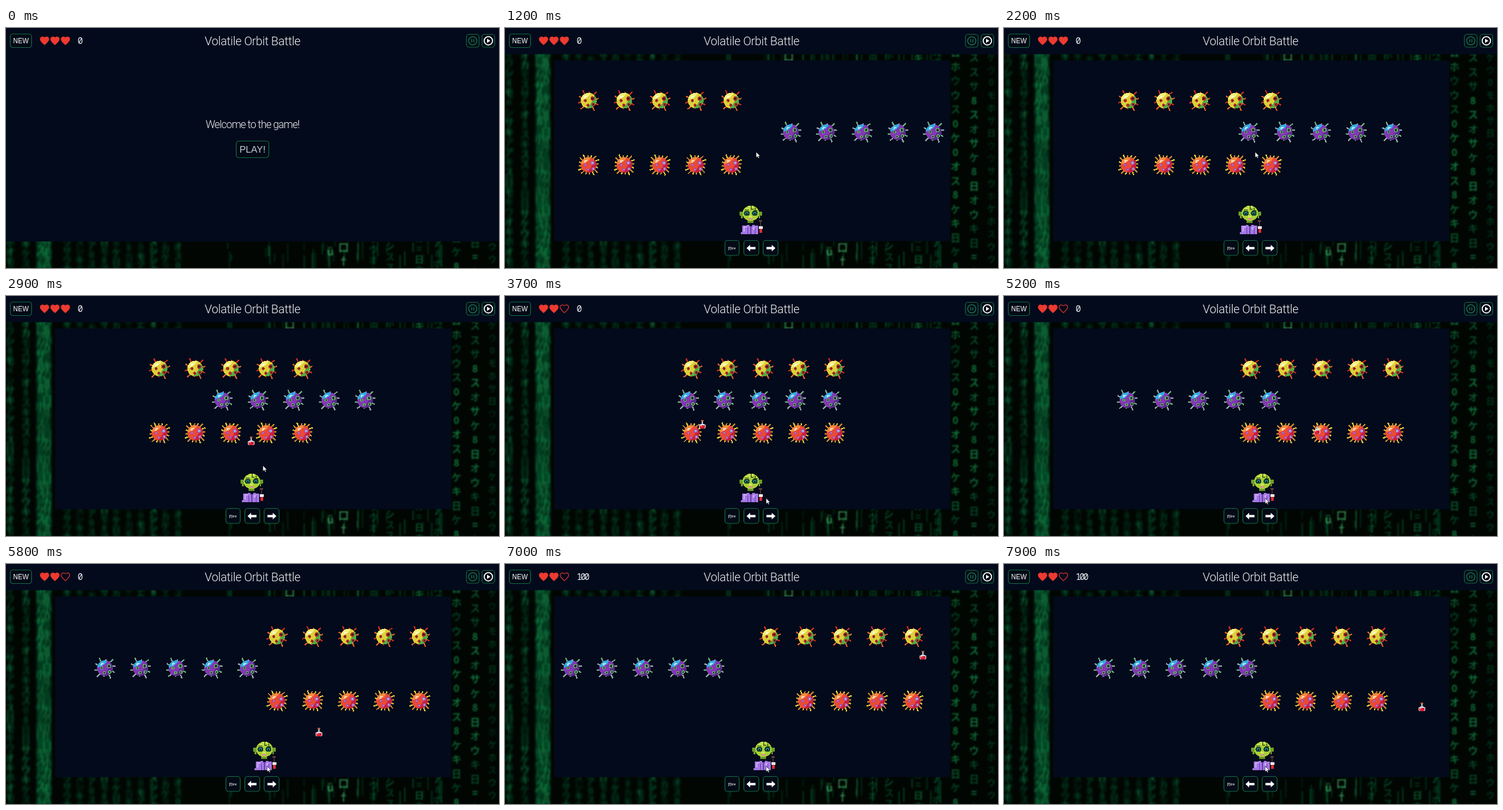
An HTML page that plays this animation: 742 by 362 pixels, repeating every 8 s.

```html
<!DOCTYPE html>
<html lang="en">
<head>
<meta charset="utf-8">
<title>Volatile Orbit Battle</title>
<style>
html, body { margin: 0; width: 100%; height: 100%; overflow: hidden; background: #030a1b; }
svg { display: block; width: 742px; height: 362px; }
.px { shape-rendering: crispEdges; }
.ui { font-family: "Liberation Sans", Arial, sans-serif; fill: #fff; }
.thin { font-family: Roboto, "Open Sans", sans-serif; font-weight: 300; fill: #eef2f6; }
.mono { font-family: "Noto Sans Mono", "DejaVu Sans Mono", monospace; fill: #eef2f6; }
.rain { font-family: "Noto Sans CJK JP", "Noto Sans CJK", "Noto Sans", sans-serif; font-weight: 700; text-anchor: middle; }
.box { fill: #030a16; stroke: #12633f; stroke-width: 1.2; }
</style>
</head>
<body>
<svg id="stage" viewBox="0 0 742 362" xmlns="http://www.w3.org/2000/svg">
  <defs>
    <filter id="soft" x="-5%" y="-5%" width="110%" height="110%"><feGaussianBlur stdDeviation="1.7 2.2"/></filter>
    <filter id="fine" x="-5%" y="-5%" width="110%" height="110%"><feGaussianBlur stdDeviation="0.8"/></filter>
    <path id="heart" transform="scale(.64) translate(-12 -12.2)" d="M12 21.35l-1.45-1.32C5.4 15.36 2 12.28 2 8.5 2 5.42 4.42 3 7.5 3c1.74 0 3.41.81 4.5 2.09C13.09 3.81 14.76 3 16.5 3 19.58 3 22 5.42 22 8.5c0 3.78-3.4 6.86-8.55 11.54z"/>
    <path id="arrow" d="M-7 0L-1.5-5V-1.7H6.5V1.7H-1.5V5Z" fill="#fff"/>
    <g id="flask" class="px">
      <path d="M-2-7h4v2h-4z" fill="#b5573a"/>
      <path d="M-1-5h2v4h-2z" fill="#b9c4cf"/>
      <path d="M-3-1h6v1h2v5h-1v1h-8v-1h-1v-5h2z" fill="#d5dce2"/>
      <path d="M-4 1h8v4h-1v1h-6v-1h-1z" fill="#d51f36"/>
      <path d="M-3 1h2v2h-2z" fill="#ff8a8a"/>
    </g>
    <g id="hero" class="px">
      <path d="M-18-12h5v10h-3v-4h-2zM16-12h-5v10h2v-4h3z" fill="#6f9f2c"/>
      <path d="M-6 0h9v6h-9z" fill="#6a932a"/>
      <ellipse cx="-1" cy="-9.5" rx="12.5" ry="11.5" fill="#a9cf35"/>
      <path d="M-9-17h7v2h-7zM-6-20h10v2h-10zM-4-6h5v3h-5z" fill="#cbe757"/>
      <path d="M-1-21h1v5h3v1h-4zM5-18h1v4h-1zM-10-15h6v1h-6zM3-14h6v1h-6z" fill="#24381b"/>
      <ellipse cx="-7" cy="-9.5" rx="4.5" ry="3.5" fill="#133f3b"/>
      <ellipse cx="5" cy="-9.5" rx="4.5" ry="3.5" fill="#133f3b"/>
      <path d="M-9-11h4v3h-4zM3-11h4v3h-4z" fill="#2a9a90"/>
      <path d="M-8-10h2v2h-2zM4-10h2v2h-2z" fill="#06110f"/>
      <path d="M-4-2h6v2h-6z" fill="#e784a7"/>
      <path d="M-6 5h9v1h-9z" fill="#15200f"/>
      <path d="M-14 9h7v-1h4v2h4v-2h4v1h5v13h-26v-3h2z" fill="#a578e6"/>
      <path d="M-12 10h5v2h-3v6h-2zM2 11h4v4h-4z" fill="#c9a4f6"/>
      <path d="M-6 12h1v10h-1zM5 12h1v10h-1zM-2 10h2v12h-2z" fill="#6a42ab"/>
      <path d="M11 1h5v2h-5zM13 3h1v7h-1z" fill="#71423c"/>
      <path d="M11 10h6v4h-6z" fill="#eff1f2"/><path d="M12 14h4v6h-4z" fill="#e02c34"/>
    </g>
  </defs>
  <rect width="742" height="362" fill="#010603"/>
  <g id="rain" class="rain"></g>
  <g id="intro">
    <rect width="742" height="322" fill="#030a1b"/>
    <text class="thin" x="371" y="151" font-size="16" letter-spacing="-.8" text-anchor="middle">Welcome to the game!</text>
    <rect class="box" x="346.5" y="170.5" width="49" height="25" rx="4"/>
    <text class="ui" x="371" y="188" font-size="14.2" text-anchor="middle" style="fill:#bfc9d6">PLAY!</text>
  </g>
  <g id="game">
    <rect width="742" height="39.5" fill="#030a1b"/>
    <rect x="74" y="49" width="596" height="272.5" fill="#030a1b"/>
    <g id="yellows"></g>
    <g id="reds"></g>
    <use id="shot" href="#flask"/>
    <g id="purples"></g>
    <use id="player" href="#hero"/>
    <rect class="box" x="331" y="320.5" width="21.5" height="22.5" rx="4"/>
    <rect class="box" x="359.5" y="320.5" width="22.5" height="22.5" rx="4"/>
    <rect class="box" x="388.5" y="320.5" width="22.5" height="22.5" rx="4"/>
    <text class="ui" x="341.5" y="334" font-size="6" text-anchor="middle">[f]ire</text>
    <use href="#arrow" x="370.5" y="332"/>
    <use href="#arrow" transform="translate(400 332) scale(-1 1)"/>
  </g>
  <rect class="box" x="6.5" y="9" width="32" height="20.5" rx="4"/>
  <text class="ui" x="22.5" y="23" font-size="10" text-anchor="middle">NEW</text>
  <g fill="#ee3a30" stroke="#ee3a30" stroke-width="1.6">
    <use href="#heart" x="58" y="19.3"/>
    <use href="#heart" x="73.7" y="19.3"/>
    <use id="life" href="#heart" x="89.4" y="19.3"/>
  </g>
  <text id="score" class="mono" x="107.8" y="23.9" font-size="13.5" letter-spacing="-2.4">0</text>
  <text class="thin" x="371" y="26" font-size="18" letter-spacing="-.3" text-anchor="middle">Volatile Orbit Battle</text>
  <rect class="box" x="693" y="9.5" width="19" height="19.5" rx="4"/>
  <rect class="box" x="716.5" y="9.5" width="19" height="19.5" rx="4"/>
  <g fill="none" stroke="#1c7350" stroke-width="1.3">
    <circle cx="702.5" cy="19.3" r="6.2"/><path d="M700.9 16.8v5M704.1 16.8v5"/>
  </g>
  <circle cx="726" cy="19.3" r="6.3" fill="none" stroke="#fff" stroke-width="1.6"/>
  <path d="M724 16.2l5 3.1-5 3.1z" fill="#fff"/>
  <path id="cursor" d="M0 0V8.5L2 6.7 3.4 9.6 4.8 9 3.5 6.2H6Z" fill="#fff" stroke="#000" stroke-width=".5"/>
</svg>
<script>
const $ = id => document.getElementById(id);
const LOOP = 8000, START = 600, GAP = 53.7;

function seeded(s) {
  return () => {
    s = (s * 1664525 + 1013904223) >>> 0;
    return s / 4294967296;
  };
}

// Falling-code backdrop: blurred on the left, streaks mid-way, glyphs on the right
function buildRain() {
  const rnd = seeded(41), glyphs = "アウオカキケサシス日8日0=ホモ";
  const hidden = (x, y) => x > 84 && x < 660 && y > 66 && y < 312;

  const column = (x, size, pitch, alpha) => {
    let out = "";
    for (let y = 40 + rnd() * pitch; y < 376; y += pitch) {
      const a = alpha * (0.45 + 0.55 * rnd());
      const ch = glyphs[Math.floor(rnd() * glyphs.length)];
      if (!hidden(x, y)) out += `<text x="${x}" y="${y.toFixed(1)}" font-size="${size}" fill-opacity="${a.toFixed(2)}">${ch}</text>`;
    }
    return out;
  };
  const streak = (x, y, w, h, a) =>
    `<rect x="${x.toFixed(1)}" y="${y.toFixed(1)}" width="${w}" height="${h.toFixed(1)}" fill-opacity="${a.toFixed(2)}"/>`;

  let soft = streak(46, 36, 22, 330, 0.28), fine = "";
  for (const x of [52, 62]) soft += column(x, 17, 13, 0.9);
  for (const x of [6, 30]) soft += column(x, 15, 15, 0.75);
  for (let x = 92; x < 268; x += 18.5) soft += column(Math.round(x), 14, 14, 0.45 + rnd() * 0.5);
  for (let i = 0; i < 40; i++) {
    const x = 330 + rnd() * 330;
    fine += streak(x, 318 + rnd() * 25, 1.5, 8 + rnd() * 26, 0.2 + rnd() * 0.4);
    fine += streak(x, 39, 1.5, 10, 0.2 + rnd() * 0.4);
  }
  for (const x of [553, 578, 622, 650]) fine += column(x, 14, 16, 0.75);
  for (const x of [678, 706]) fine += column(x, 15, 21.5, 0.95);
  fine += column(732, 13, 19, 0.4);
  fine += [["ü", 488, 343], ["口", 508, 337], ["†", 508, 357], ["口", 427, 49]]
    .map(([ch, x, y]) => `<text x="${x}" y="${y}" font-size="16" font-weight="400" fill="#45b96c">${ch}</text>`).join("");
  $("rain").innerHTML =
    `<g fill="#0f8a48" filter="url(#soft)">${soft}</g><g fill="#0f7d40" filter="url(#fine)">${fine}</g>`;
}

// Viruses: a shaded ball with ringed spots and spikes that are longest on the diagonals
const kinds = {
  yellow: { spikes: ["#c92d20", "#d9622a"], base: "#dccf38", shade: "#4fae45", light: "#f4ee7a", spot: "#b3342c", core: "#4d1420" },
  purple: { spikes: ["#6fae84", "#93a9ad"], base: "#8338b4", shade: "#5d2a8e", light: "#30aede", spot: "#5fae62", core: "#2a2440" },
  red: { spikes: ["#dcc83a", "#c58a30"], base: "#ea4a34", shade: "#c5203a", light: "#f48a3c", spot: "#b8479c", core: "#9cb4e0" }
};

function virus({ spikes, base, shade, light, spot, core }, count) {
  let out = "";
  for (let k = 0; k < count; k++) {
    const a = (k + 0.5) * 2 * Math.PI / count;
    const len = 13 + 5 * Math.abs(Math.sin(2 * a));
    const at = (r, turn) => `${(Math.cos(a + turn) * r).toFixed(1)} ${(Math.sin(a + turn) * r).toFixed(1)}`;
    out += `<path d="M${at(8, 0)}L${at(len, 0.12)}" stroke="${spikes[k % 2]}" stroke-width="2"/>`;
  }
  out += `<circle r="11.8" fill="${base}"/>` +
    `<path d="M8.5-8.2A11.8 11.8 0 0 1-3 11.4Q5 5 8.5-8.2Z" fill="${shade}"/>` +
    `<path d="M-11-4A11.8 11.8 0 0 1 3-11.2Q1-4-11-1Z" fill="${light}"/>` +
    `<path d="M-6-8h4v2h-2v2h-3z" fill="#fff" fill-opacity=".6"/>`;
  for (const [x, y, r] of [[-5, 0, 2.4], [6, -3, 3.2], [-1, 7, 2.4], [7, 6, 2.6]])
    out += `<circle cx="${x}" cy="${y}" r="${r}" fill="${spot}"/><circle cx="${x}" cy="${y}" r="${r - 1.4}" fill="${core}"/>`;
  return out;
}

function buildRow(id, kind, y, count) {
  const art = virus(kinds[kind], count);
  let out = "";
  for (let i = 0; i < 5; i++) out += `<g class="px" transform="translate(${i * GAP} ${y})">${art}</g>`;
  $(id).innerHTML = out;
}

// Piecewise-linear track through [time, value] points
function track(points, t) {
  if (t <= points[0][0]) return points[0][1];
  for (let i = 1; i < points.length; i++) {
    const [t0, v0] = points[i - 1], [t1, v1] = points[i];
    if (t <= t1) return v0 + (v1 - v0) * (t - t0) / (t1 - t0);
  }
  return points[points.length - 1][1];
}

const outer = [[600, 89], [2200, 187.5], [3700, 281], [4500, 328], [5800, 408], [6340, 440], [7000, 399], [7900, 347]];
const inner = [[600, 413], [1040, 440], [2200, 369], [3700, 276], [4500, 228], [5800, 149], [6800, 88], [7000, 100], [7900, 151]];
// Each drop: first moment, last moment, x, y at first moment
const drops = [[1600, 3250, 369, 105], [3300, 5050, 296.5, 159], [5080, 6500, 471, 191], [6640, 8000, 628.5, 106]];

const place = (id, x, y) => $(id).setAttribute("transform", `translate(${x.toFixed(1)} ${y.toFixed(1)})`);
const show = (el, on) => el.setAttribute("display", on ? "inline" : "none");

function render(ms) {
  const t = Math.floor(ms / 100) * 100;
  const playing = t >= START;
  show($("intro"), !playing);
  show($("game"), playing);

  place("yellows", track(outer, t), 0);
  place("reds", track(outer, t), 0);
  place("purples", track(inner, t), 0);
  place("player", t < 4100 ? 371 : 390, 289);

  const drop = drops.find(d => t >= d[0] && t < d[1]);
  show($("shot"), drop);
  if (drop) place("shot", drop[2], drop[3] + (t - drop[0]) * 0.0875);

  const hit = t >= 6800;
  show($("reds").firstChild, !hit);
  $("score").textContent = hit ? "100" : "0";
  $("life").setAttribute("fill", t < 3250 ? "#ee3a30" : "none");

  show($("cursor"), t >= 400);
  const p = track([[2400, 0], [3300, 1]], t);
  const e = p * p * (3 - 2 * p);
  place("cursor", 378 + 15 * e, 187 + 118 * e);
}

buildRain();
buildRow("yellows", "yellow", 109.5, 10);
buildRow("purples", "purple", 157, 10);
buildRow("reds", "red", 206.5, 16);

const begin = performance.now();
function tick() {
  render((performance.now() - begin) % LOOP);
  requestAnimationFrame(tick);
}
render(0);
requestAnimationFrame(tick);
</script>
</body>
</html>
```
